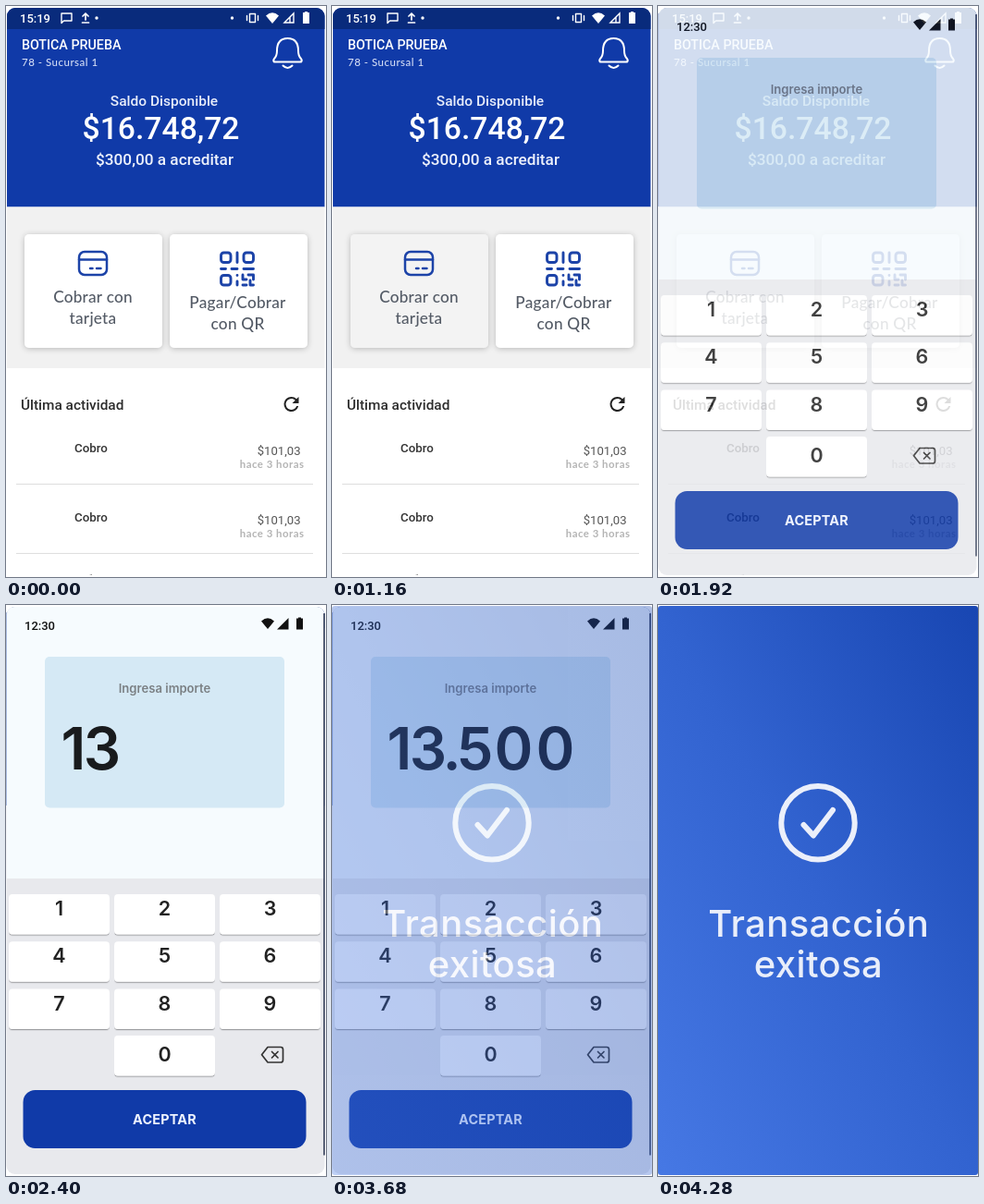
Animation, 346 px wide and 618 px high, one loop 4320 ms. Source, as an HTML page:

```html
<!DOCTYPE html>
<html lang="es">
<head>
<meta charset="utf-8">
<title>Cobro con tarjeta</title>
<style>
html, body { margin: 0; width: 100%; height: 100%; overflow: hidden; background: #fff; }
svg { display: block; width: 100vw; height: 100vh; }
text { font-family: Roboto, sans-serif; font-weight: 500; }
.soft { font-family: Lato, sans-serif; }
.pad { font-family: Inter, sans-serif; }
.bold { font-weight: 600; }
.heavy { font-weight: 700; }
.mid { text-anchor: middle; }
.end { text-anchor: end; }
.line { fill: none; stroke-linecap: round; stroke-linejoin: round; }
</style>
</head>
<body>
<svg viewBox="0 0 346 618">
  <defs>
    <linearGradient id="sky" x1="0" y1="1" x2="1" y2="0">
      <stop offset="0" stop-color="#4678e4"/>
      <stop offset=".5" stop-color="#3263d0"/>
      <stop offset="1" stop-color="#1846b2"/>
    </linearGradient>
    <filter id="lift" x="-15%" y="-15%" width="130%" height="135%">
      <feDropShadow dx="0" dy="1" stdDeviation="3" flood-color="#000" flood-opacity=".24"/>
    </filter>
    <filter id="key" x="-10%" y="-10%" width="120%" height="130%">
      <feDropShadow dx="0" dy="1.2" stdDeviation=".6" flood-color="#000" flood-opacity=".32"/>
    </filter>
    <clipPath id="screen"><rect x="1" y="2" width="343.5" height="640" rx="9"/></clipPath>
    <path id="wifi" d="M0 3.5Q7 -2.8 14 3.5L7 12z"/>
    <path id="battery" d="M1 0h2V-1h3v1h2v12H1z"/>
  </defs>

  <g id="home">
    <g clip-path="url(#screen)">
      <path fill="#103aa8" d="M0 0h346v217.5H0z"/>
      <path fill="#092b7c" d="M0 0h346v25H0z"/>
      <path fill="#f1f1f1" d="M0 217.5h346V392H0z"/>
    </g>
    <g fill="#fff">
      <text x="15" y="18" font-size="13">15:19</text>
      <path class="line" stroke="#fff" stroke-width="1.4" d="M60 8h11v8H62.5l-2.5 2.5z"/>
      <path class="line" stroke="#fff" stroke-width="1.7" d="M86 15V8m-3 3l3-3l3 3M82.5 18h7"/>
      <circle cx="98" cy="13" r="1.7"/>
      <circle cx="244.5" cy="13" r="1.7"/>
      <path class="line" stroke="#fff" stroke-width="1.4" d="M263.5 8.500h6v9h-6zM260.500 10.500v5M272.500 10.500v5"/>
      <use href="#wifi" x="281" y="7"/>
      <path fill="none" stroke="#fff" stroke-width="1.4" d="M301 18L311 8v10zM307 18v-6"/>
      <use href="#battery" x="320" y="7"/>
      <text x="17" y="47" font-size="14.3">BOTICA PRUEBA</text>
      <text class="soft" x="17" y="65" font-size="11.5" letter-spacing=".5" fill="#d5def5">78 - Sucursal 1</text>
      <g class="mid">
        <text x="171" y="108" font-size="15.5" fill="#e8edfa">Saldo Disponible</text>
        <text x="167.5" y="144" font-size="33.7">$16.748,72</text>
        <text x="171.5" y="172" font-size="17.2" fill="#eef2fc">$300,00 a acreditar</text>
      </g>
    </g>
    <path class="line" stroke="#fff" stroke-width="2" d="M290 60.5q-1.5-1.5 0-3.5q3-3 3-8.5C293 40 297 35 304.5 35S316 40 316 48.5q0 5.5 3 8.5q1.500 2 0 3.500zM299.500 64.500q5 5 10 0"/>

    <rect id="card" x="20" y="247" width="149" height="123" rx="5" filter="url(#lift)"/>
    <rect x="177" y="247" width="149" height="123" rx="5" fill="#fff" filter="url(#lift)"/>
    <g class="line" stroke="#1c43a8" stroke-width="2.5">
      <rect x="79" y="266" width="30" height="25" rx="6"/>
      <path d="M79 274.5h30M91 284h2.500M98 284h4.500"/>
    </g>
    <g class="line" stroke="#1c43a8" stroke-width="2.9">
      <rect x="232.5" y="267" width="10.5" height="10.5" rx="3"/>
      <rect x="257" y="267" width="10.5" height="10.5" rx="3"/>
      <rect x="232.5" y="291.5" width="10.5" height="10.5" rx="3"/>
      <path d="M250 267v10.5M232.5 284.500h5M244 284.500h6M257 284.500h10.500M250 291.500v.1M250 298v4M256 291v5h4M262 291h5.500v5M256 302h4M264 297v5h3.500"/>
    </g>
    <g class="mid" fill="#545b66" font-size="17.2" letter-spacing=".25">
      <text class="soft" x="94" y="321">Cobrar con</text>
      <text class="soft" x="94" y="344">tarjeta</text>
      <text class="soft" x="250.5" y="327">Pagar/Cobrar</text>
      <text class="soft" x="250.5" y="350">con QR</text>
    </g>

    <text x="16" y="437" font-size="15.4" fill="#2c2c2c">Última actividad</text>
    <path fill="#222" transform="translate(296.5 419)" d="M17.65 6.35A7.95 7.95 0 0 0 12 4a8 8 0 1 0 7.73 10h-2.08A6 6 0 1 1 12 6c1.66 0 3.14.69 4.22 1.78L13 11h7V4z"/>
    <g id="rows"></g>
    <path fill="#999" d="M90 616l3-1.2v1.2z"/>
  </g>

  <g id="amount">
    <rect x=".5" y="2" width="344" height="614" rx="9" fill="#e8e9ed"/>
    <path fill="#f6fbfe" d="M1 296V11q0-9 9-9h325q9 0 9 9v285z"/>
    <path stroke="#a9bbe0" d="M.5 8v209"/>
    <path stroke="#27324e" stroke-width="1.5" d="M344 9v586.5"/>
    <g fill="#111">
      <text x="20" y="26.5" font-size="13">12:30</text>
      <use href="#wifi" x="276" y="14"/>
      <path d="M293 26.5L305.5 14v12.5z"/>
      <use href="#battery" x="313" y="14.5"/>
    </g>
    <rect x="42" y="56" width="259" height="163.5" rx="5" fill="#d5e9f5"/>
    <text class="pad mid bold" x="171.5" y="94.5" font-size="13.1" fill="#7b8084">Ingresa importe</text>
    <g id="digits" class="mid" font-size="63.5" fill="#191b1d"></g>
    <g id="keys" class="mid" font-size="21.5" fill="#222"></g>
    <path class="line" stroke="#333" stroke-width="1.7" d="M283 478.5h14q2.5 0 2.5 2.5v11.500q0 2.500-2.500 2.500h-14l-6.500-8.300zM287.500 483.500l6.500 6.500m0-6.500l-6.500 6.500"/>
    <rect x="18.5" y="525" width="306" height="63" rx="13" fill="#103aa8"/>
    <text class="pad mid heavy" x="171.5" y="562" font-size="14.4" letter-spacing=".2" fill="#eef3ff">ACEPTAR</text>
  </g>

  <g id="done">
    <rect y="1" width="346" height="616" rx="3" fill="url(#sky)"/>
    <g class="line" stroke="#ebeffa" stroke-width="6">
      <circle cx="173" cy="235.8" r="39.7"/>
      <path d="M157.5 238l10.5 11.5L189 222"/>
    </g>
    <g class="mid" font-size="40" letter-spacing=".4" fill="#e9eefa">
      <text class="pad" x="173.7" y="359">Transacción</text>
      <text class="pad" x="173.5" y="403">exitosa</text>
    </g>
  </g>
</svg>
<script>
const LOOP = 4320;
const $ = id => document.getElementById(id);
const ramp = (t, from, to) => {
  const p = Math.min(1, Math.max(0, (t - from) / (to - from)));
  return p * p * (3 - 2 * p);
};

$('rows').innerHTML = [0, 75].map(y => `<g transform="translate(0 ${y})">
  <text x="74" y="483" font-size="13.3" fill="#333">Cobro</text>
  <text class="end" x="318.5" y="486" font-size="13.1" style="font-weight:400" fill="#555">$101,03</text>
  <text class="soft end heavy" x="322.5" y="500" font-size="11.4" letter-spacing=".5" fill="#b4b4b4">hace 3 horas</text>
  <path stroke="#dedede" stroke-width="1.2" d="M11 517.5h321"/></g>`).join('');

const keyAt = (label, col, y) =>
  `<rect x="${3 + col * 114}" y="${y}" width="109" height="43.5" rx="4" fill="#fff" filter="url(#key)"/>
   <text class="pad bold" x="${57.5 + col * 114}" y="${y + (label ? 23 : 28)}">${label}</text>`;
const keys = [...Array(9).keys()].map(i => keyAt(i + 1, i % 3, 313 + Math.floor(i / 3) * 51.3));
$('keys').innerHTML = keys.join('') + keyAt(0, 1, 466);

const centres = [73, 104, 129.5, 155, 196.5, 241.5];
$('digits').innerHTML = [...'13.500'].map((c, i) =>
  `<text class="pad bold" x="${centres[i]}" y="177.5">${c}</text>`).join('');
const digits = [...$('digits').children];

function draw(t) {
  const press = ramp(t, 280, 840) - ramp(t, 1360, 1680);
  const shade = Math.round(255 - 12 * press);
  $('card').setAttribute('fill', `rgb(${shade},${shade},${shade})`);
  $('amount').setAttribute('opacity', ramp(t, 1680, 2000));
  digits.forEach((d, i) => {
    const start = 2120 + i * 160;
    d.setAttribute('opacity', ramp(t, start, start + 100));
  });
  $('done').setAttribute('opacity', ramp(t, 3560, 3860));
}

const begin = performance.now();
function tick() {
  draw((performance.now() - begin) % LOOP);
  requestAnimationFrame(tick);
}
draw(0);
requestAnimationFrame(tick);
</script>
</body>
</html>
```
